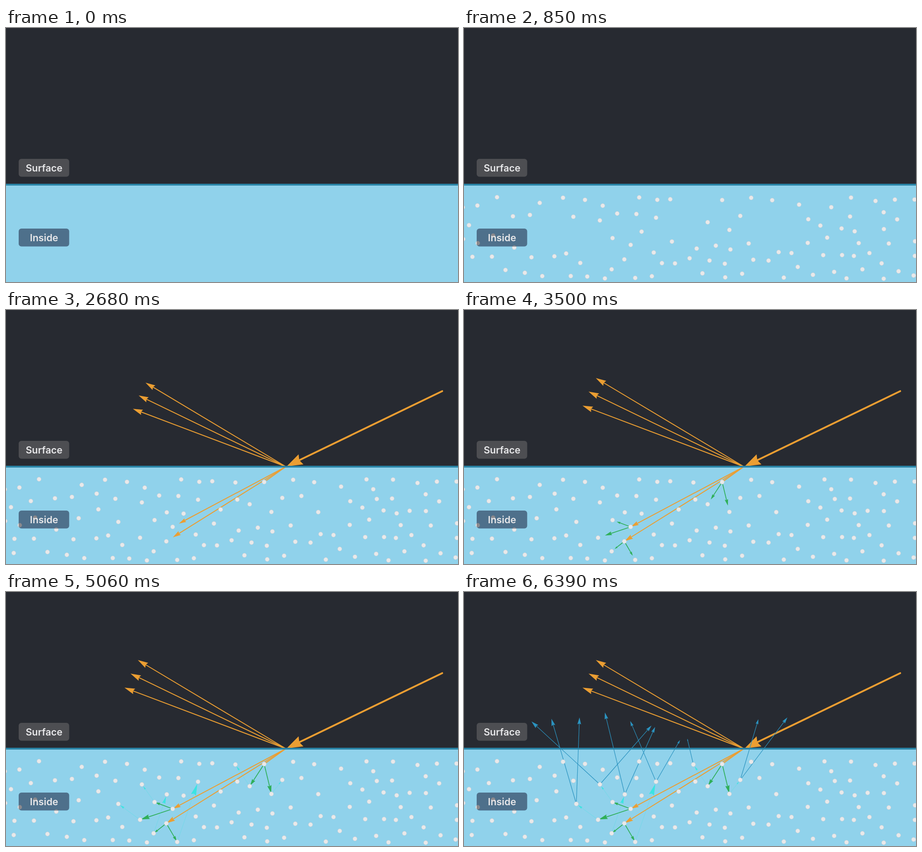
Animation, 998 px wide and 561 px high, one loop 6420 ms. Source, as an HTML page:

```html
<!DOCTYPE html>
<html lang="en">
<head>
<meta charset="utf-8">
<title>Light scattering below a surface</title>
<style>
  html, body { margin: 0; width: 100%; height: 100%; overflow: hidden; background: #272a31; }
  svg { display: block; width: 100vw; height: 100vh; }
  text { font: 600 21.4px Inter, "Liberation Sans", sans-serif; fill: #e8e8ea; text-anchor: middle; }
  .shaft { fill: none; stroke: currentColor; }
  .head { fill: currentColor; }
  .dots { fill: #e9e9ea; stroke: #c8cdd3; stroke-width: .7; }
  .veiled { fill: #8b898d; }
</style>
</head>
<body>
<svg viewBox="0 0 998 561">
  <clipPath id="tag"><rect x="28" y="443" width="111.5" height="39.5" rx="6"/></clipPath>
  <rect width="998" height="561" fill="#272a31"/>
  <rect y="346" width="998" height="215" fill="#90d2eb"/>
  <g id="rays"></g>
  <g class="dots"><g id="dots"></g></g>
  <rect y="344" width="998" height="4" fill="#2a84a6"/>
  <rect x="28" y="289" width="111.5" height="39.5" rx="6" fill="#4d4e52"/>
  <rect x="28" y="443" width="111.5" height="39.5" rx="6" fill="#4e708b"/>
  <g class="veiled" clip-path="url(#tag)"><use href="#dots"/></g>
  <text x="84" y="316.5">Surface</text>
  <text x="84" y="470.5">Inside</text>
</svg>
<script>
const LOOP = 6420, GROW = 600, FIRST = 1365, STEP = 940;
const DOTS_START = 100, DOTS_TIME = 1196, DOT_COUNT = 115;

const ENTRY = [618, 346];
const INCIDENCE = 25.8, SPREAD = 5.1;

// Light meets a particle, scatters to a second and a third, then leaves
const hits = [
  { at: [570, 380], paths: [
    { mid: [538, 429], exit: [506.5, 381], out: [[493, 324]] },
    { mid: [586, 446], exit: [610, 415], out: [[650, 281], [714, 277]] }] },
  { at: [368, 479], paths: [
    { mid: [328, 464], exit: [300, 425], out: [[149, 286], [414, 295]] },
    { mid: [296, 503], exit: [248, 468], out: [[193, 280], [255, 277]] }] },
  { at: [354, 511], paths: [
    { mid: [326, 533], exit: [355, 447], out: [[311, 266], [422, 298]] },
    { mid: [378, 552], exit: [424, 419], out: [[367, 285], [477, 327]] }] }
];
const paths = hits.flatMap(h => h.paths);

function fromEntry(length, degrees) {
  const a = degrees * Math.PI / 180;
  return [ENTRY[0] + length * Math.cos(a), ENTRY[1] - length * Math.sin(a)];
}

const reflected = [1, 0, -1].map(i => [ENTRY, fromEntry(382, 180 - INCIDENCE - i * SPREAD)]);
const refracted = hits.map(h => [ENTRY, h.at]);

// head: length per shaft length; wide: head width per head length; gap: stop before the end point
const stages = [
  { color: '#eb9e32', width: 4, head: .092, wide: .7, gap: 2, rays: [[fromEntry(383.3, INCIDENCE), ENTRY]] },
  { color: '#eb9e32', width: 2, head: .06, wide: .56, gap: 1, rays: [...reflected, ...refracted] },
  { color: '#2faf58', width: 1.7, head: .26, wide: .55, gap: 2,
    rays: hits.flatMap(h => h.paths.map(p => [h.at, p.mid])) },
  { color: '#3be4e2', width: 1, head: .19, wide: .45, gap: 5, faint: .3,
    rays: paths.map(p => [p.mid, p.exit]) },
  { color: '#2b93c0', width: 1.2, head: .08, wide: .54, gap: 0,
    rays: paths.flatMap(p => p.out.map(tip => [p.exit, tip])) }
];

const clamp = v => Math.min(1, Math.max(0, v));
const easeOut = (v, power) => 1 - (1 - clamp(v)) ** power;
const distance = (a, b) => Math.hypot(a[0] - b[0], a[1] - b[1]);

let seed = 7;
const random = () => (seed = seed * 16807 % 2147483647) / 2147483647;

// Fill the water evenly: of several random spots, keep the one farthest from all others
function scatterDots(fixed) {
  const spots = [...fixed];
  const room = p => Math.min(...spots.map(s => distance(s, p)));
  while (spots.length < DOT_COUNT) {
    const tries = Array.from({ length: 12 }, () => [-4 + 1004 * random(), 372 + 183 * random()]);
    spots.push(tries.reduce((best, p) => room(p) > room(best) ? p : best));
  }
  return spots.map(p => ({ p, order: random() })).sort((a, b) => a.order - b.order).map(s => s.p);
}

function add(parent, name, attrs) {
  const el = document.createElementNS('http://www.w3.org/2000/svg', name);
  for (const key in attrs) el.setAttribute(key, attrs[key]);
  return parent.appendChild(el);
}

const dotLayer = document.getElementById('dots');
const dots = scatterDots([...hits.map(h => h.at), ...paths.flatMap(p => [p.mid, p.exit])])
  .map(([cx, cy]) => add(dotLayer, 'circle', { cx, cy, r: 4.7 }));

const rayLayer = document.getElementById('rays');
const arrows = stages.flatMap((stage, i) => {
  const group = add(rayLayer, 'g', { color: stage.color });
  return stage.rays.map(([from, to]) => {
    const angle = Math.atan2(to[1] - from[1], to[0] - from[0]) * 180 / Math.PI;
    const el = add(group, 'g', { transform: `translate(${from}) rotate(${angle})` });
    return {
      stage, el,
      start: FIRST + i * STEP,
      length: distance(from, to) - stage.gap,
      shaft: add(el, 'path', {
        class: 'shaft', 'stroke-width': stage.width, 'stroke-opacity': stage.faint || 1,
        'stroke-linecap': i ? 'butt' : 'round'
      }),
      head: add(el, 'path', { class: 'head' })
    };
  });
});

function drawArrow(a, t) {
  const grown = easeOut((t - a.start) / GROW, 3);
  a.el.style.display = grown > 0 ? '' : 'none';
  const tip = a.length * grown;
  const size = tip * a.stage.head;
  const half = size * a.stage.wide / 2;
  const notch = tip - size * .88;
  a.shaft.setAttribute('d', `M0 0H${notch + size * .1}`);
  a.head.setAttribute('d', `M${tip} 0L${tip - size} ${half}L${notch} 0L${tip - size} ${-half}Z`);
}

function draw(t) {
  const shown = Math.round(dots.length * easeOut((t - DOTS_START) / DOTS_TIME, 2));
  dots.forEach((dot, i) => { dot.style.display = i < shown ? '' : 'none'; });
  arrows.forEach(a => drawArrow(a, t));
}

const begin = performance.now();
function tick() {
  draw((performance.now() - begin) % LOOP);
  requestAnimationFrame(tick);
}
tick();
</script>
</body>
</html>
```
